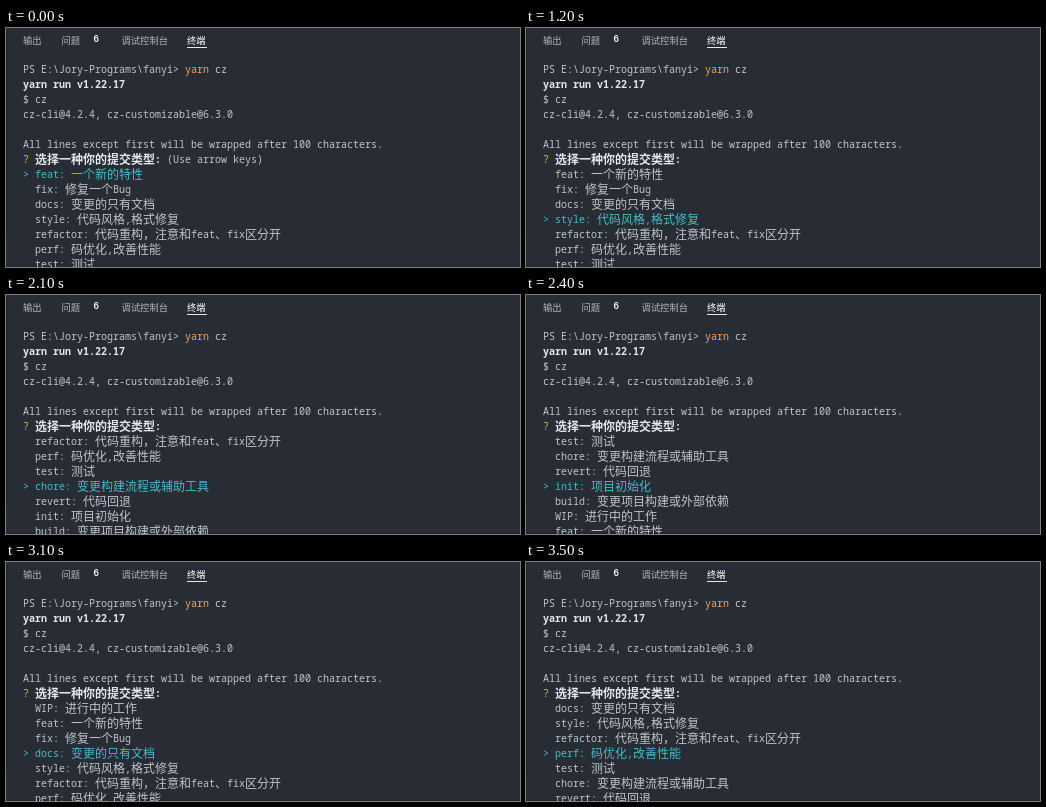
These frames come from a looping animation (514 by 239 pixels, 4500 ms). An HTML page with a canvas:

```html
<!DOCTYPE html>
<html lang="zh-CN">
<head>
<meta charset="utf-8">
<title>Terminal menu</title>
<style>
  html, body { margin: 0; width: 100%; height: 100%; overflow: hidden; background: #282c34; }
  canvas { display: block; width: 514px; height: 239px; }
</style>
</head>
<body>
<canvas id="stage"></canvas>
<script>
const W = 514, H = 239, LOOP = 4500;
const LEFT = 17, CELL = 6, FIRST_BASELINE = 45, ROW = 15;
const MONO = '"Noto Sans Mono", "DejaVu Sans Mono", monospace';
const CJK = '"Noto Sans CJK SC", "Noto Sans CJK", sans-serif';
const COLOR = {
  bg: '#282c34', edge: '#1f2329', text: '#bec4cf', bright: '#e3e6eb',
  tab: '#b4b8c0', command: '#f0a45d', mark: '#b0c95a', active: '#45bccb'
};

const OPTIONS = [
  'feat: 一个新的特性',
  'fix: 修复一个Bug',
  'docs: 变更的只有文档',
  'style: 代码风格,格式修复',
  'refactor: 代码重构，注意和feat、fix区分开',
  'perf: 码优化,改善性能',
  'test: 测试',
  'chore: 变更构建流程或辅助工具',
  'revert: 代码回退',
  'init: 项目初始化',
  'build: 变更项目构建或外部依赖',
  'WIP: 进行中的工作'
];
const VISIBLE = 7, ANCHOR = 3;

// The prompt vanishes on the first key press, then each press moves down one option.
const CLEAR_AT = 900;
const MOVES = [1000, 1100, 1200, 1400, 1800, 1900, 2100, 2200, 2400, 2500,
               2700, 2800, 2900, 3100, 3200, 3300, 3500];

const canvas = document.getElementById('stage');
const ctx = canvas.getContext('2d');
const dpr = window.devicePixelRatio || 1;
canvas.width = Math.round(W * dpr);
canvas.height = Math.round(H * dpr);
ctx.scale(dpr, dpr);

function rect(x, y, w, h, color) {
  ctx.fillStyle = color;
  ctx.fillRect(x, y, w, h);
}

function label(str, x, y, font, color) {
  ctx.font = font;
  ctx.fillStyle = color;
  ctx.fillText(str, x, y);
}

// Terminal text: narrow characters take one cell, wide ones two and sit a pixel lower.
function print(str, col, row, color = COLOR.text, bold = false) {
  let x = LEFT + col * CELL;
  const y = FIRST_BASELINE + row * ROW;
  for (const run of str.match(/[\x20-\x7e]+|[^\x20-\x7e]+/g)) {
    const wide = run.charCodeAt(0) > 126;
    if (wide) label(run, x, y + 1, `${bold ? 700 : 400} 12px ${CJK}`, color);
    else label(run, x, y, `${bold ? 700 : 500} 10px ${MONO}`, color);
    x += run.length * CELL * (wide ? 2 : 1);
  }
}

function drawTabs() {
  const font = `9.3px ${CJK}`;
  label('输出', 17, 16, font, COLOR.tab);
  label('问题', 55.5, 16, font, COLOR.tab);
  label('6', 87.5, 14, '600 8.5px Inter, sans-serif', '#ffffff');
  label('调试控制台', 115.5, 16, font, COLOR.tab);
  label('终端', 181, 16, `500 ${font}`, '#ffffff');
  rect(181, 19, 20, 1, COLOR.bright);
}

function drawOutput() {
  print('PS E:\\Jory-Programs\\fanyi>', 0, 0);
  print('yarn', 27, 0, COLOR.command);
  print('cz', 32, 0);
  print('yarn run v1.22.17', 0, 1, COLOR.bright, true);
  print('$ cz', 0, 2);
  print('cz-cli@4.2.4, cz-customizable@6.3.0', 0, 3);
  print('All lines except first will be wrapped after 100 characters.', 0, 5);
}

function drawMenu(t) {
  const moved = MOVES.filter(at => at <= t).length;
  if (t >= CLEAR_AT && moved === 0) return;

  print('?', 0, 6, COLOR.mark);
  print('选择一种你的提交类型:', 2, 6, COLOR.bright, true);
  if (moved === 0) print('(Use arrow keys)', 24, 6);

  const top = Math.max(0, moved - ANCHOR);
  for (let i = 0; i < VISIBLE; i++) {
    const active = top + i === moved;
    const color = active ? COLOR.active : COLOR.text;
    if (active) print('>', 0, 7 + i, color);
    print(OPTIONS[(top + i) % OPTIONS.length], 2, 7 + i, color);
  }
}

function frame() {
  const t = performance.now() % LOOP;
  rect(0, 0, W, H, COLOR.bg);
  rect(0, 0, 1, 210, COLOR.edge);
  rect(0, H - 1, W, 1, COLOR.edge);
  drawTabs();
  drawOutput();
  drawMenu(t);
  requestAnimationFrame(frame);
}
frame();
</script>
</body>
</html>
```
